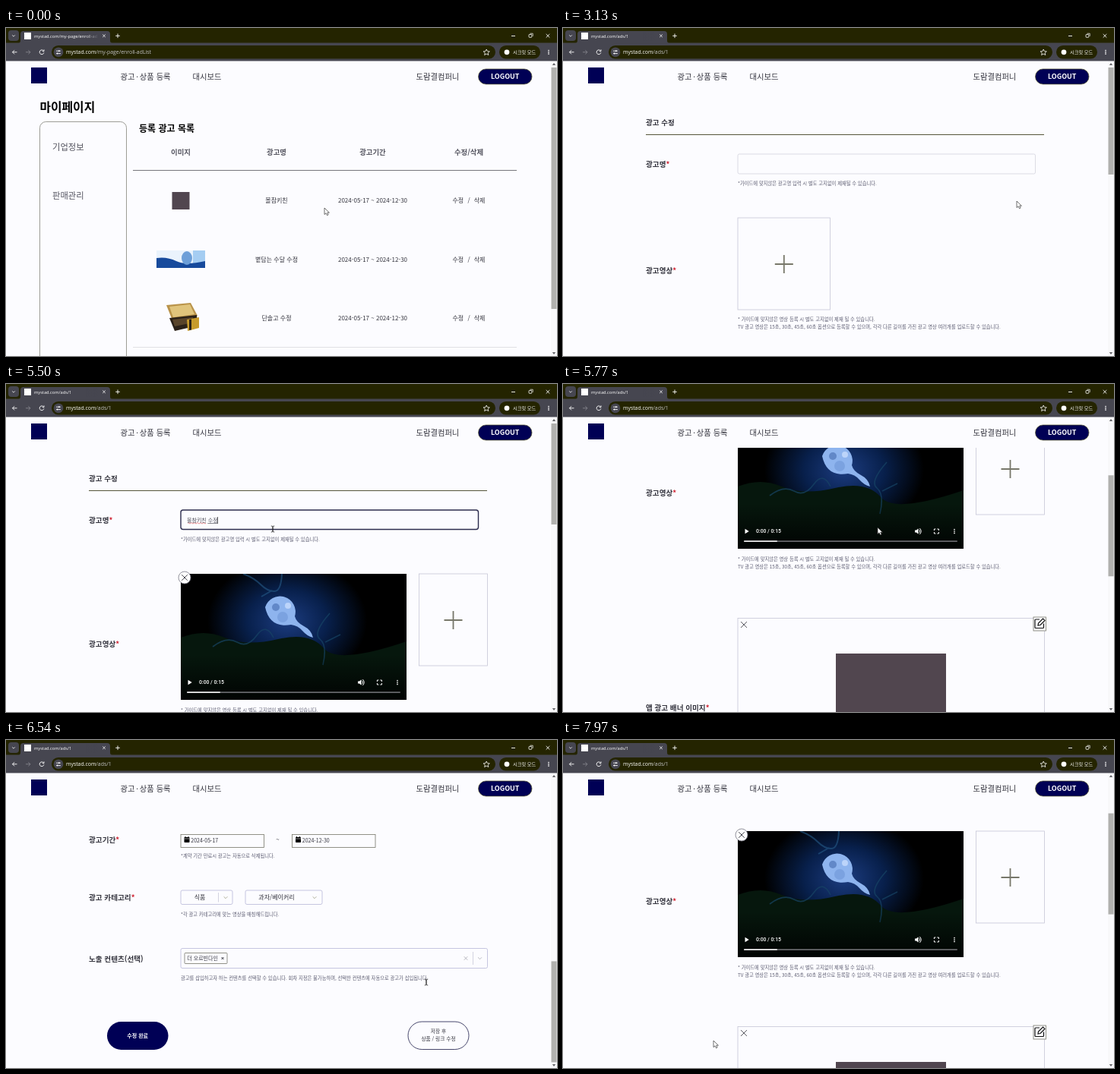
An HTML page that plays this animation: 725x432 px, repeating every 8000 ms.

```html
<!DOCTYPE html>
<html lang="ko">
<head>
<meta charset="utf-8">
<title>광고 관리</title>
<style>
  html, body { margin: 0; width: 100%; height: 100%; overflow: hidden; background: #fcfcff; }
  svg { display: block; width: 100%; height: 100%; }
  text { font-family: "Noto Sans CJK KR", "Noto Sans CJK", "Noto Sans CJK JP", sans-serif; white-space: pre; fill: #33333d; }
  .ui { font-family: "Open Sans", "Noto Sans", sans-serif; }
  .clock { font-family: Roboto, sans-serif; font-weight: 500; }
  .bold { font-weight: 700; }
  .black { fill: #000; }
  .white { fill: #fff; }
  .grey { fill: #555560; }
  .note { fill: #5c5c70; }
</style>
</head>
<body>
<svg id="stage" viewBox="0 0 725 432"></svg>
<script>
const LOOP = 8000;
const PAGE_CHANGE = 2800, DATA_READY = 3520, FOCUS = 4420;
const PAPER = '#fcfcff', NAVY = '#000055', INK = '#33333d', BAR = '#464650', DARK = '#242400';
const BRAND = '볼참키친';

// Markup helpers; text is placed by the middle of its line.
const text = (x, cy, size, str, style = '', attrs = '') =>
  `<text x="${x}" y="${(cy + size * 0.36).toFixed(2)}" font-size="${size}" class="${style}" ${attrs}>${str}</text>`;
const mid = (x, cy, size, str, style) => text(x, cy, size, str, style, 'text-anchor="middle"');
const rect = (x, y, w, h, attrs = '') => `<rect x="${x}" y="${y}" width="${w}" height="${h}" ${attrs}/>`;
const box = (x, y, w, h, color, r = 0, width = 0.8) =>
  rect(x, y, w, h, `rx="${r}" fill="none" stroke="${color}" stroke-width="${width}"`);
const line = (d, color, width = 0.9, attrs = '') =>
  `<path d="${d}" fill="none" stroke="${color}" stroke-width="${width}" ${attrs}/>`;
const fill = (d, color) => `<path d="${d}" fill="${color}"/>`;
const disc = (x, y, r, color) => `<circle cx="${x}" cy="${y}" r="${r}" fill="${color}"/>`;
const group = (id, body, attrs = '') => `<g id="${id}" ${attrs}>${body}</g>`;
const cross = (x, y, r, color, width) => line(`M${x - r} ${y - r}l${2 * r} ${2 * r}m0 ${-2 * r}l${-2 * r} ${2 * r}`, color, width);
const plus = (x, y, r, color, width) => line(`M${x - r} ${y}h${2 * r}M${x} ${y - r}v${2 * r}`, color, width);
const chevron = (x, y, r, color, width) => line(`M${x - r} ${y - r / 2}l${r} ${r}l${r} ${-r}`, color, width);
const label = (cy, str) => text(109, cy, 9.6, `${str}<tspan fill="#d02030">*</tspan>`, 'bold');
const note = (cy, str) => text(230, cy, 6.3, str, 'note');
const dots = (x, cy, gap) => [-gap, 0, gap].map(d => disc(x, cy + d, 0.85, '#fff')).join('');

const browserTab = (id, path) => group(id,
  text(37, 10.5, 5.7, 'mystad.com' + path, 'ui white', 'clip-path="url(#tabClip)"') +
  text(79, 31.6, 6.9, `mystad.com<tspan fill="#c4c4c8">${path}</tspan>`, 'ui white'));

const browser = () =>
  rect(0, 0, 725, 20, `fill="${DARK}"`) + rect(0, 19.5, 725, 24, `fill="${BAR}"`) +
  rect(3, 3, 14, 14, `rx="4" fill="${BAR}"`) + chevron(10, 10.3, 1.8, '#fff', 0.8) +
  fill('M16 20q3 0 3-4V8q0-4 4-4h110q4 0 4 4v8q0 4 3 4z', BAR) +
  rect(24, 6, 9, 9, 'fill="#fff"') +
  rect(60, 23, 584, 17.5, `rx="8.7" fill="${DARK}"`) + rect(649, 23, 54, 17.5, `rx="8.7" fill="${DARK}"`) +
  browserTab('listTab', '/my-page/enroll-adList') + browserTab('formTab', '/ads/1') +
  rect(105, 5, 17, 12, 'fill="url(#tabFade)"') +
  cross(129, 10.3, 1.8, '#fff', 0.8) + plus(147, 10.3, 2.8, '#fff', 0.9) +
  line('M665 10.5h5', '#fff') + box(688, 8.5, 3.8, 3.8, '#fff', 0.6) + line('M689.5 7.2h3.7v3.7', '#fff', 0.7) +
  cross(713, 10.3, 2.3, '#fff') +
  line('M14.5 31.8h-6m2.6-2.6l-2.6 2.6l2.6 2.6', '#fff') +
  line('M26 31.8h6m-2.6-2.6l2.6 2.6l-2.6 2.6', '#85858d') +
  line('M49.5 30.2a2.9 2.9 0 1 0 .4 2.2M50 28.4v2.2h-2.2', '#fff') +
  disc(69, 31.8, 6.4, BAR) + line('M66.2 30.2h2.4m1 0h2.2M66.2 33.6h1m1.2 0h3.5', '#fff') +
  disc(69.7, 30.2, 1, '#fff') + disc(67.6, 33.6, 1, '#fff') +
  line('M632.2 28l1.2 2.6 2.9.3-2.2 1.9.7 2.8-2.6-1.5-2.6 1.5.7-2.8-2.2-1.9 2.9-.3z', '#fff', 0.8) +
  disc(659, 31.8, 3.4, '#fff') + text(667, 31.6, 6.2, '시크릿 모드', 'white') +
  dots(714, 31.8, 2.3);

const siteHeader = () =>
  rect(0, 43.5, 717, 40.5, `fill="${PAPER}"`) +
  rect(33, 52, 21, 21, `fill="${NAVY}"`) +
  text(150.5, 64, 10.3, '광고') + mid(172.7, 64, 10.3, '·') + text(175.8, 64, 10.3, '상품 등록') +
  text(245.5, 64, 10.3, '대시보드') + text(539.5, 64, 10.3, '도람결컴퍼니') +
  rect(621.5, 54, 70.5, 20, `rx="10" fill="${NAVY}" stroke="#55552a" stroke-width=".7"`) +
  mid(656.7, 64, 9, 'LOGOUT', 'bold white');

const listRow = (cy, name) =>
  mid(356, cy, 8, name) + mid(482.5, cy, 8, '2024-05-17 ~ 2024-12-30') +
  text(587.5, cy, 8, '수정') + mid(609, cy, 8, '/') + text(615.7, cy, 8, '삭제');

const listPage = () =>
  text(44.5, 104, 15.8, '마이페이지', 'bold black') +
  box(44.5, 123.5, 114, 330, '#85857c', 8) +
  text(61, 156.5, 11.3, '기업정보', 'grey') + text(61, 221, 11.3, '판매관리', 'grey') +
  text(175, 132.5, 12, '등록 광고 목록', 'bold black') +
  [['이미지', 230], ['광고명', 356], ['광고기간', 482.5], ['수정/삭제', 609]]
    .map(([name, x]) => mid(x, 164, 9.4, name, 'bold grey')).join('') +
  line('M167 187.5h505', '#77777c', 1) + line('M167 420.5h505', '#d8d8de', 0.8) +
  listRow(227, BRAND) + listRow(305, '볕담는 수달 수정') + listRow(382, '단솔고 수정') +
  rect(218.5, 216, 23, 23, 'fill="#51464f"') +
  rect(198, 293, 64, 23, 'fill="#eaf3fc"') + rect(246, 293, 16, 18, 'fill="#a5cdf2"') +
  fill('M198 303q14-2 26 4t38 0v9h-64z', '#174a9c') + '<ellipse cx="238" cy="303" rx="7" ry="9" fill="#6d9fd8"/>' +
  fill('M211 365l32-3 9 17-33 6z', '#b9934a') + fill('M215 367l27-3 6 13-28 4z', '#e0c47c') +
  fill('M215 382l36-4 1 14-30 7z', '#2b2118') + fill('M219 384l27-3v7l-24 5z', '#59442a') +
  fill('M238 384l16-3v14l-15 4z', '#c79b2c') + fill('M241 384l3-.6v14l-3 .7z', '#2b2118');

const video = () => group('video',
  rect(0, 0, 297, 166, 'fill="#000"') +
  '<ellipse cx="140" cy="62" rx="105" ry="82" fill="url(#night)"/>' +
  fill('M0 84q30-12 58 0t70 2t60 12t109-9v77H0z', '#06170d') +
  line('M82 0q14 5 23 14t18 9t10-23M120 22l-14 8', '#255b88', 2, 'opacity=".6"') +
  line('M42 96q18-14 32-6t26-9t22 3M187 120q6-26-4-34t13-34M190 90l20-10', '#174566', 1.6, 'opacity=".7"') +
  fill('M111 44a20 20 0 1 1 39 12q2 8 12 13t12 15q-8-2-14-9t-15-8q-28 5-34-23z', '#8eb4ee') +
  disc(125, 44, 5, '#6288c8') + disc(134, 57, 7, '#7ba2e0') + disc(141, 42, 4, '#bcd4fa') +
  rect(0, 106, 297, 60, 'fill="url(#shade)"') +
  fill('M9.5 139.8v6.4l5.2-3.2z', '#fff') + text(24, 143, 6.8, '0:00 / 0:15', 'clock white') +
  fill('M233 141.6h2l2.5-2.4v7.6l-2.5-2.4h-2z', '#fff') + line('M238.8 140.8q1.6 2.2 0 4.4M239.3 139q4 4 0 8', '#fff') +
  line('M258.4 142v-2h2m2 0h2v2m0 2v2h-2m-2 0h-2v-2', '#fff', 1) + dots(285, 143, 2.4) +
  rect(8, 155.2, 281, 1.8, 'rx=".9" fill="#66666a"') + rect(8, 155.2, 44, 1.8, 'rx=".9" fill="#e6e6e6"'),
  'transform="translate(230 250)" clip-path="url(#videoClip)"') +
  '<circle cx="235" cy="255" r="8" fill="#fff" stroke="#777784" stroke-width=".8"/>' + cross(235, 255, 3.8, INK);

const videoNotes = cy =>
  note(cy, '* 가이드에 맞지않은 영상 등록 시 별도 고지없이 제재 될 수 있습니다.') +
  note(cy + 9.5, 'TV 광고 영상은 15초, 30초, 45초, 60초 옵션으로 등록할 수 있으며, 각각 다른 길이를 가진 광고 영상 여러개를 업로드할 수 있습니다.');

const formTop = () =>
  text(109, 124.5, 9.5, '광고 수정', 'bold') + line('M109 140.5h524', '#55553a', 1.2) +
  label(180, '광고명') +
  note(205, '*가이드에 맞지않은 광고명 입력 시 별도 고지없이 제재될 수 있습니다.') +
  group('idleField', box(230, 166, 391.5, 26, '#d4d4de', 2)) +
  group('focusField', box(230, 166, 391.5, 25.5, '#2c2c4e', 3, 1.4) +
    line('M239 183.3' + 'q1-1.6 2 0t2 0'.repeat(6), '#e04040', 0.6));

const dateField = (x, date) =>
  box(x, 822.5, 109.5, 17, '#77776a') +
  rect(x + 4.5, 826, 7, 7, 'rx=".8" fill="#000"') + line(`M${x + 6} 825v2m4-2v2`, '#000', 1) +
  line(`M${x + 4.5} 828h7`, PAPER, 0.6) + text(x + 13.3, 830, 7, date);

const formRest = () =>
  label(343, '광고영상') + video() +
  box(543.5, 250, 90, 121, '#c6c6d6') + plus(588.5, 311, 12, '#77776a', 1.8) + videoNotes(430) +
  label(626, '앱 광고 배너 이미지') + box(230, 507.5, 403.5, 227, '#c6c6d6') +
  rect(359, 554, 145, 145, 'fill="#51464f"') +
  cross(238, 516, 4, INK, 0.8) +
  rect(619, 506, 16.5, 18, `fill="${PAPER}" stroke="#77776a" stroke-width=".8"`) +
  line('M627 509h-5q-1 0-1 1v9.5q0 1 1 1h9.5q1 0 1-1v-5M625 517l.5-3 6-6 2.5 2.5-6 6z', '#111', 1.2) +
  note(748, '* 가이드에 맞지않은 이미지 등록 시 별도 고지없이 제재 될 수 있습니다.') +
  label(830, '광고기간') + dateField(230, '2024-05-17') + dateField(376.5, '2024-12-30') + mid(357.5, 829.5, 8, '~') +
  note(851, '*계약 기간 만료시 광고는 자동으로 삭제됩니다.') +
  label(906, '광고 카테고리') + box(230, 896, 68, 18.5, '#b8b8d8', 2) + box(315, 896, 101, 18.5, '#b8b8d8', 2) +
  mid(255, 905.5, 8, '식품') + mid(356, 905.5, 8, '과자/베이커리') +
  line('M279.5 899v12.5', '#c8c8d8', 0.8) + chevron(289, 905.5, 2.4, '#a8a890') + chevron(406, 905.5, 2.4, '#a8a890') +
  note(928, '*각 광고 카테고리에 맞는 영상을 매칭해드립니다.') +
  text(109, 986.5, 9.6, '노출 컨텐츠(선택)', 'bold') + box(230, 972.5, 403.5, 26, '#b8b8d8', 2) +
  box(235, 978.5, 56, 14, '#77776a', 1) + text(238.3, 985.5, 7, '더 오르빈다인') + cross(285, 985.5, 1.5, INK, 1) +
  cross(605, 985.5, 2.3, '#b0b0b8') + line('M614.5 977v17', '#c8c8d8', 0.8) + chevron(623.5, 985.5, 2.4, '#b0b0b8') +
  note(1011.5, '광고를 삽입하고자 하는 컨텐츠를 선택할 수 있습니다. 회차 지정은 불가능하며, 선택한 컨텐츠에 자동으로 광고가 삽입됩니다.') +
  rect(133, 1069, 80.5, 37, `rx="18.5" fill="${NAVY}"`) + mid(173.2, 1087.5, 7, '수정 완료', 'bold white') +
  box(529, 1069, 80, 36.5, '#33335c', 18.2, 0.9) + mid(569, 1082, 6.7, '저장 후') + mid(569, 1092, 6.7, '상품 / 링크 수정');

const formLoading = () =>
  label(320, '광고영상') + box(230, 250, 121.5, 121, '#c6c6d6') + plus(290.8, 311, 12, '#77776a', 1.8) + videoNotes(384);

// States of the name field while the syllables are being composed.
const typing = [
  [DATA_READY, ''], [4640, ' '], [4740, ' ㅅ'], [4850, ' 수'], [5000, ' 수ㅈ'], [5120, ' 수저'], [5240, ' 수정'],
].map(([from, tail], i, all) => ({ id: 'typed' + i, from, to: all[i + 1]?.[0] ?? LOOP, tail }));

const typedText = ({ id, from, tail }) => {
  const start = 238 + BRAND.length * 6.44 + (tail ? 1.57 : 0);
  const caret = start + tail.trim().length * 6.44;
  return group(id, text(238, 179.3, 7, BRAND + tail, 'grey') +
    (tail.trim() ? line(`M${start} 183.5H${caret}`, INK, 0.6) : '') +
    (from > FOCUS ? line(`M${caret + 0.4} 175v9`, '#111', 0.7) : ''));
};

const cursor = () => group('cursor',
  group('arrow', '<path d="M0 0v8.6l2-1.8 1.5 3 1.6-.8-1.4-2.8h2.7z" fill="#fff" stroke="#333" stroke-width=".7"/>') +
  group('hand', '<path d="M1 1q1-1 1.8 0v4l3.6 1q1 .4.7 2l-.8 3.5h-4l-3-4q0-1.2 1.7-.3z" fill="#fff" stroke="#333" stroke-width=".7"/>') +
  group('ibeam', line('M-2.2-4q2.2 0 2.2 1v6q0 1-2.2 1M2.2-4q-2.2 0-2.2 1v6q0 1 2.2 1', '#222', 0.8)));

const thumb = (id, height) => group(id, rect(717.5, 52, 7, height, 'fill="#b0b0ae"'));

document.getElementById('stage').innerHTML = `
  <defs>
    <clipPath id="tabClip"><rect x="36" y="4" width="84" height="14"/></clipPath>
    <clipPath id="view"><rect x="0" y="84" width="717" height="348"/></clipPath>
    <clipPath id="videoClip"><rect width="297" height="166"/></clipPath>
    <linearGradient id="tabFade"><stop stop-color="${BAR}" stop-opacity="0"/><stop offset="1" stop-color="${BAR}"/></linearGradient>
    <linearGradient id="shade" x2="0" y2="1"><stop stop-opacity="0"/><stop offset="1" stop-opacity=".85"/></linearGradient>
    <radialGradient id="night"><stop stop-color="#1c3c80"/><stop offset=".5" stop-color="#08204c"/><stop offset="1" stop-color="#000"/></radialGradient>
  </defs>
  ${rect(0, 0, 725, 432, `fill="${PAPER}"`)}
  ${group('listPage', listPage())}
  <g clip-path="url(#view)">
    ${group('scroller', group('formPage', formTop()) + group('loading', formLoading()) +
      group('loaded', formRest()) + typing.map(typedText).join(''))}
  </g>
  ${siteHeader()}
  ${rect(717, 43.5, 8, 388.5, 'fill="#f8f8fa"')}
  ${fill('M718.8 49h4.4l-2.2-3zM718.8 427h4.4l-2.2 3z', '#66666a')}
  ${thumb('listThumb', 318)}${thumb('loadingThumb', 141)}${thumb('formThumb', 133)}
  ${browser()}
  ${cursor()}`;

const startTime = document.timeline.currentTime || 0;
function play(id, steps, style, easing = 'linear') {
  const frames = steps.map(([time, ...values]) => ({ offset: time / LOOP, easing, ...style(...values) }));
  document.getElementById(id).animate(frames, { duration: LOOP, iterations: Infinity }).startTime = startTime;
}
const move = (x, y) => ({ transform: `translate(${x}px, ${y}px)` });

function show(id, ...ranges) {
  const steps = ranges.flatMap(([from, to]) => [[from, 1], [to, 0]]);
  if (steps[0][0] > 0) steps.unshift([0, 0]);
  if (steps.at(-1)[0] < LOOP) steps.push([LOOP, 0]);
  play(id, steps, opacity => ({ opacity }), 'step-end');
}

['listPage', 'listTab', 'listThumb'].forEach(id => show(id, [0, PAGE_CHANGE]));
['formPage', 'formTab'].forEach(id => show(id, [PAGE_CHANGE, LOOP]));
['loading', 'loadingThumb'].forEach(id => show(id, [PAGE_CHANGE, DATA_READY]));
['loaded', 'formThumb'].forEach(id => show(id, [DATA_READY, LOOP]));
show('idleField', [PAGE_CHANGE, FOCUS]);
show('focusField', [FOCUS, LOOP]);
typing.forEach(({ id, from, to }) => show(id, [from, to]));

const scroll = [[0, 0], [5530, 0], [5770, 198], [6250, 698], [7150, 698], [7960, 130], [LOOP, 130]];
play('scroller', scroll, y => move(0, -y));
play('formThumb', scroll, y => move(0, y * 0.343));

play('cursor', [
  [0, 419, 237], [350, 419, 237], [1050, 597, 228], [3850, 597, 228], [4330, 351, 191], [5520, 351, 191],
  [5760, 414, 189], [6000, 414, 189], [6380, 553, 319], [6650, 553, 319], [7050, 198, 396], [LOOP, 198, 396],
], move);
show('arrow', [0, 1000], [PAGE_CHANGE, 4250], [5540, 6330], [6700, 7000], [7170, LOOP]);
show('hand', [1000, PAGE_CHANGE], [7000, 7170]);
show('ibeam', [4250, 5540], [6330, 6700]);
</script>
</body>
</html>
```
